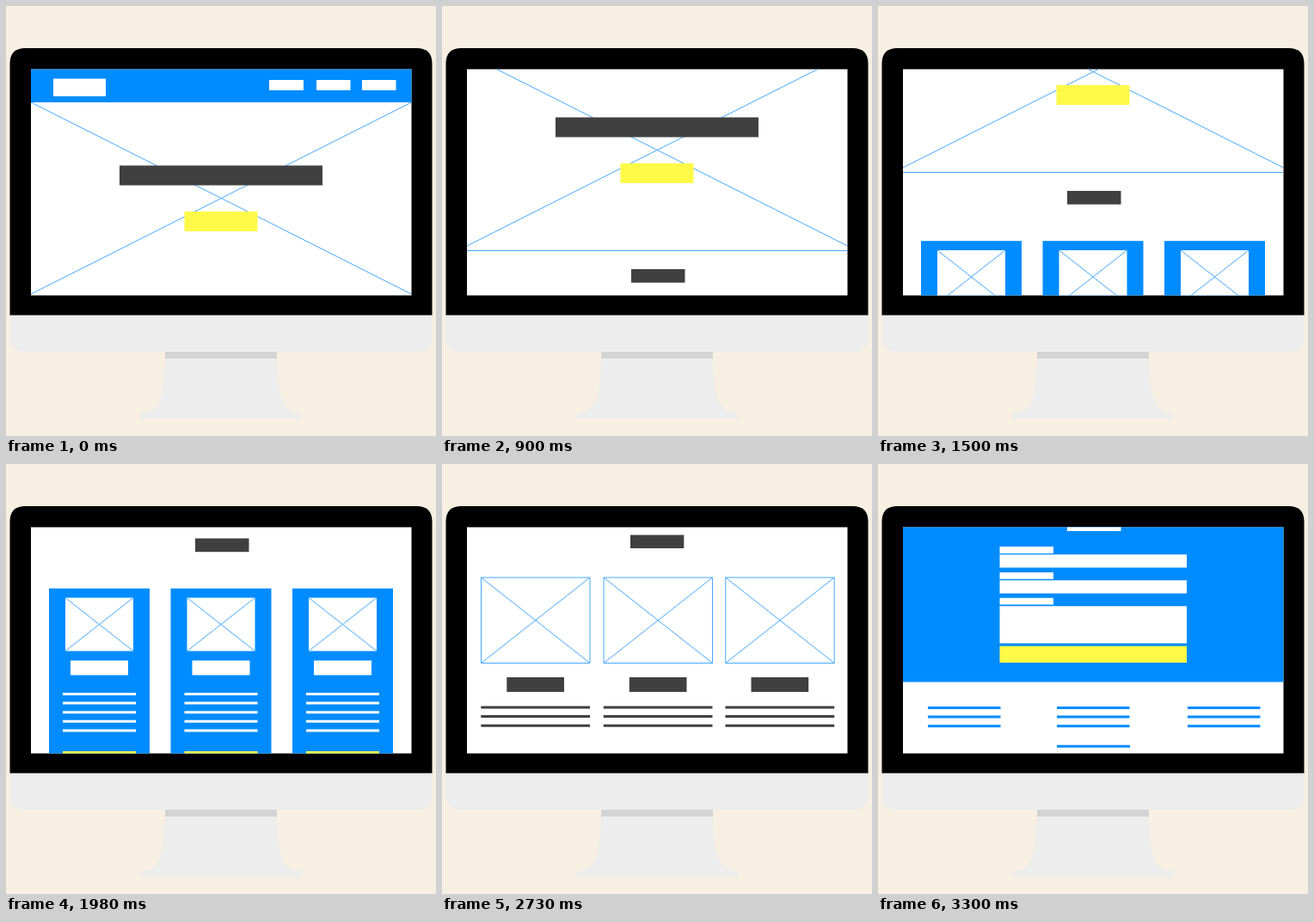
Recreate the animation shown at these times as an HTML page. Size 500 by 500 pixels, loop 3.63 s.

```html
<!DOCTYPE html>
<html lang="en">
<head>
<meta charset="utf-8">
<title>Scrolling wireframe</title>
<style>
html, body { margin: 0; width: 100%; height: 100%; overflow: hidden; background: #f7efe1; }
svg { display: block; width: 100%; height: 100%; }
.blue { fill: #008cff; }
.white { fill: #fff; }
.dark { fill: #3f403f; }
.yellow { fill: #fffa48; }
.line { fill: none; stroke: #45a8ff; stroke-width: 1; }
</style>
</head>
<body>
<svg viewBox="0 0 500 500">
  <defs>
    <clipPath id="screen"><rect x="29" y="73.5" width="442.5" height="263"/></clipPath>
    <g id="card">
      <rect class="blue" x="50" y="420.2" width="117" height="223.3"/>
      <rect class="white" x="69" y="431" width="79" height="62"/>
      <path class="line" d="M69 431L148 493M148 431L69 493"/>
      <rect class="white" x="75" y="504" width="67" height="17"/>
      <path stroke="#fff" stroke-width="3" d="M66 543h85m-85 10.6h85m-85 10.6h85m-85 10.6h85m-85 10.6h85"/>
      <rect class="yellow" x="66" y="609.5" width="85" height="23"/>
    </g>
    <g id="post">
      <path class="line" d="M45.5 781H172V880.5H45.5ZL172 880.5M172 781L45.5 880.5"/>
      <rect class="dark" x="75.3" y="897" width="66.7" height="17"/>
      <path stroke="#3f403f" stroke-width="3" d="M45.3 932h126.7m-126.7 10.6h126.7m-126.7 10.6h126.7"/>
    </g>
    <path id="links" stroke="#008cff" stroke-width="3" d="M58 283.5h84.5m-84.5 10.6h84.5m-84.5 10.6h84.5"/>
  </defs>

  <path fill="#ededed" d="M185 402H315C315 440 318 472 338 472.5Q344 473 344.500 480H155.500Q156 473 162 472.500C182 472 185 440 185 402Z"/>
  <rect x="185" y="402" width="130" height="8" fill="#d4d4d4"/>
  <path d="M4.500 360V67Q4.500 49 22.500 49H477.500Q495.500 49 495.500 67V360Z"/>
  <path fill="#ededed" d="M4.500 359.500H495.500V384Q495.500 402 477.500 402H22.500Q4.500 402 4.500 384Z"/>

  <g clip-path="url(#screen)">
    <rect class="white" x="29" y="73" width="443" height="264"/>
    <g id="page">
      <rect class="blue" x="29" y="73" width="443" height="39"/>
      <rect class="white" x="55" y="84.500" width="61" height="20.500"/>
      <path class="white" d="M306 86h40v12h-40zM361 86h39.500v12h-39.500zM414 86h39.500v12h-39.500z"/>
      <path class="line" d="M29 112L471.500 335M471.500 112L29 335M29 340.500H471.500"/>
      <rect class="dark" x="132" y="185.500" width="236" height="23"/>
      <rect class="yellow" x="207.500" y="239" width="85" height="23"/>

      <rect class="dark" x="220" y="362" width="62.500" height="15.700"/>
      <use href="#card"/>
      <use href="#card" x="141.500"/>
      <use href="#card" x="283"/>
      <path class="line" d="M29 697.700H471.500"/>

      <rect class="dark" x="219" y="731.500" width="62.300" height="15.500"/>
      <use href="#post"/>
      <use href="#post" x="142.500"/>
      <use href="#post" x="284.200"/>

      <g transform="translate(0 975)">
        <rect class="blue" x="29" y="35" width="443" height="218.500"/>
        <path class="white" d="M220 62.500h62.500V78H220zM141.500 96H204v8h-62.500zM141.500 126H204v7.700h-62.500zM141.500 155.800H204v7.700h-62.500z"/>
        <path class="white" d="M141.500 105.200H359v15.300H141.500zM141.500 135.200H359v15.300H141.500zM141.500 165.200H359v43.300H141.500z"/>
        <rect class="yellow" x="141.500" y="211.700" width="217.500" height="19.300"/>
        <use href="#links"/>
        <use href="#links" x="150"/>
        <use href="#links" x="302"/>
        <path stroke="#008cff" stroke-width="3" d="M208 328.200h85"/>
      </g>
    </g>
  </g>
</svg>
<script>
const LOOP = 3630, STEP = 30, END = 3300;
// [time in ms, scroll in px, speed in px/ms]
const keys = [
  [0, 0, 0.025], [900, 56, 0.11], [1500, 147, 0.21], [1980, 275.5, 0.34],
  [2310, 407.5, 0.47], [2730, 649, 0.67], [END, 975, 0.2]
];
const page = document.getElementById('page');

function scrollAt(t) {
  let i = 0;
  while (i < keys.length - 2 && t >= keys[i + 1][0]) i++;
  const [t0, a, va] = keys[i], [t1, b, vb] = keys[i + 1];
  const d = t1 - t0, u = (t - t0) / d, w = 1 - u;
  return a * w * w * (1 + 2 * u) + b * u * u * (3 - 2 * u) + d * u * w * (va * w - vb * u);
}

function draw() {
  const t = Math.floor(performance.now() % LOOP / STEP) * STEP;
  page.setAttribute('transform', `translate(0 ${-scrollAt(Math.min(t, END)).toFixed(2)})`);
  requestAnimationFrame(draw);
}
draw();
</script>
</body>
</html>
```
